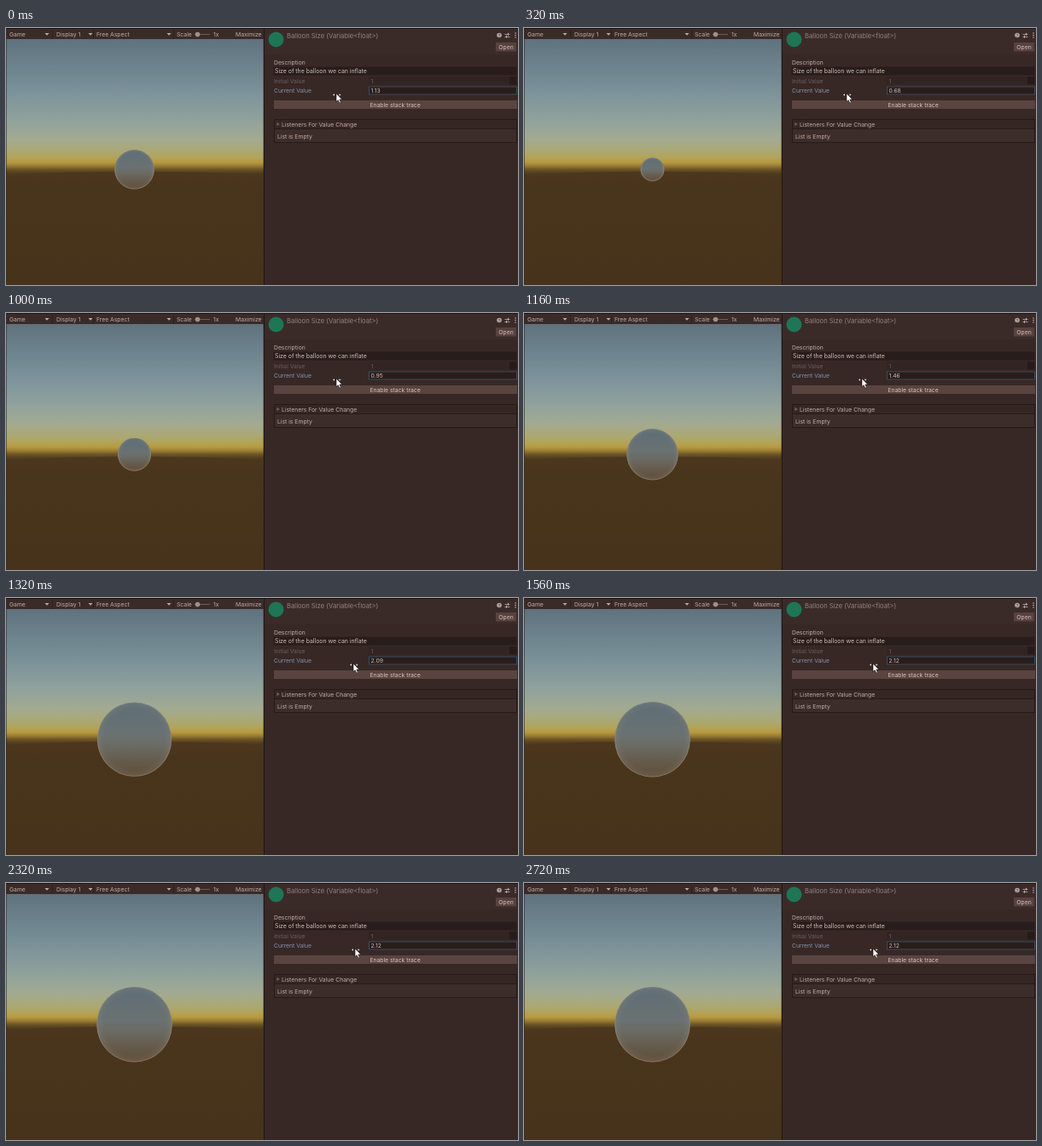
An HTML page with a canvas for the animation above (2.76 s loop, 600 by 302 pixels).

```html
<!DOCTYPE html>
<html lang="en">
<head>
<meta charset="utf-8">
<title>Balloon size</title>
<style>
  html, body { margin: 0; width: 100%; height: 100%; overflow: hidden; background: #372826; }
  canvas { display: block; width: 600px; height: 302px; }
</style>
</head>
<body>
<canvas id="stage" width="600" height="302"></canvas>
<script>
const ctx = document.getElementById('stage').getContext('2d');
const LOOP = 2760, TICK = 40;
const INK = '#c3aca5', BRIGHT = '#d3bdb6', DIM = '#705c57', FIELD = '#291d1b', EDGE = '#261a18';

// [time, value] and [time, pointer x]
const sizeKeys = [[0, 1.13], [320, 0.68], [580, 0.53], [680, 0.53], [1000, 0.95], [1120, 1.31], [1320, 2.09], [1400, 2.12], [2760, 2.12]];
const pointerKeys = [[0, 387], [320, 378], [580, 376], [680, 376], [1000, 387], [1120, 393], [1320, 407], [1400, 409], [2760, 409]];

const slope = (a, b) => (b[1] - a[1]) / (b[0] - a[0]);

function tangent(keys, i) {
  if (i === 0) return slope(keys[0], keys[1]);
  if (i === keys.length - 1) return 0;
  const a = slope(keys[i - 1], keys[i]), b = slope(keys[i], keys[i + 1]);
  return a * b > 0 ? 2 * a * b / (a + b) : 0;
}

// Monotone cubic interpolation
function track(keys, t) {
  let i = 0;
  while (i < keys.length - 2 && t >= keys[i + 1][0]) i++;
  const [t0, v0] = keys[i], [t1, v1] = keys[i + 1];
  const span = t1 - t0, u = (t - t0) / span, w = 1 - u;
  return w * w * (1 + 2 * u) * v0 + u * u * (3 - 2 * u) * v1 +
    span * u * w * (w * tangent(keys, i) - u * tangent(keys, i + 1));
}

function rect(x, y, w, h, fill) {
  ctx.fillStyle = fill;
  ctx.fillRect(x, y, w, h);
}

function frame(x, y, w, h, color) {
  ctx.strokeStyle = color;
  ctx.lineWidth = 1;
  ctx.strokeRect(x + 0.5, y + 0.5, w - 1, h - 1);
}

function shape(points, fill) {
  ctx.beginPath();
  points.forEach(([x, y]) => ctx.lineTo(x, y));
  ctx.closePath();
  ctx.fillStyle = fill;
  ctx.fill();
}

function disc(x, y, r, fill) {
  ctx.beginPath();
  ctx.arc(x, y, r, 0, Math.PI * 2);
  ctx.fillStyle = fill;
  ctx.fill();
}

function label(text, x, midY, color = INK, size = 6.8, align = 'left') {
  ctx.font = `${size}px Inter, sans-serif`;
  ctx.textAlign = align;
  ctx.fillStyle = color;
  ctx.fillText(text, x, midY + 2.5);
}

function ramp(y0, y1, stops) {
  const g = ctx.createLinearGradient(0, y0, 0, y1);
  stops.forEach(([at, color]) => g.addColorStop(at, color));
  return g;
}

function drawScene() {
  const left = 0.5, right = 301.7, middle = (left + right) / 2;
  rect(left, 13, right - left, 289, ramp(13, 174, [
    [0, '#5f727e'], [0.2, '#6d838d'], [0.42, '#7f959b'], [0.6, '#92a39c'],
    [0.73, '#a3aa90'], [0.82, '#aba873'], [0.87, '#b3a355'], [0.9, '#b6993f'],
    [0.925, '#9a7d34'], [0.95, '#6e5626'], [0.975, '#54401f'], [1, '#4a371d']
  ]));
  ctx.beginPath();
  ctx.moveTo(left, 172);
  ctx.quadraticCurveTo(middle, 165, right, 172);
  ctx.lineTo(right, 302);
  ctx.lineTo(left, 302);
  ctx.fillStyle = ramp(168, 302, [[0, '#4c381e'], [0.15, '#49341c'], [1, '#47331b']]);
  ctx.fill();
}

function drawToolbar() {
  rect(0, 1, 302, 12, '#3a2b29');
  [['Game', 4], ['Display 1', 59], ['Free Aspect', 106], ['Scale', 200], ['1x', 243], ['Maximize', 269]]
    .forEach(([text, x]) => label(text, x, 7.2));
  [48, 99, 191].forEach(x => shape([[x - 2.5, 6], [x + 2.5, 6], [x, 8.8]], INK));
  [54, 102, 196].forEach(x => rect(x, 2, 1, 11, '#2d201e'));
  rect(221, 7, 18, 1, '#705c57');
  disc(224.5, 7.5, 2.8, '#a18f89');
}

function drawHeader() {
  rect(303, 1, 297, 30, '#3a2b29');
  disc(316.5, 13.5, 9, '#1e7656');
  label('Balloon Size (Variable<float>)', 329, 9, '#95807a', 7.65);
  disc(578, 8.5, 2.8, '#b5a49d');
  label('?', 578, 8.5, '#3a2b29', 5, 'center');
  rect(584.5, 7, 6, 1, '#a3928c');
  rect(584.5, 10, 6, 1, '#a3928c');
  rect(588, 5.8, 1, 3, INK);
  rect(586, 8.8, 1, 3, INK);
  [6, 8.5, 11].forEach(y => disc(597, y, 0.8, INK));
  rect(574, 17, 24, 10.5, '#57423f');
  label('Open', 586, 22.3, BRIGHT, 6.8, 'center');
}

function drawInspector(value) {
  rect(303, 31, 297, 271, '#372826');
  drawHeader();
  label('Description', 314, 40.5);
  rect(313.5, 45.5, 285, 10, FIELD);
  label('Size of the balloon we can inflate', 315, 50.5, BRIGHT, 6.9);

  label('Initial Value', 314, 62.3, DIM);
  rect(425, 57, 165, 9.5, '#322422');
  label('1', 427.5, 62.3, DIM);
  rect(590, 57, 8.5, 9.5, '#271b19');

  label('Current Value', 314, 73.7, '#8493ad');
  rect(425, 68.5, 174, 10, FIELD);
  frame(425, 68.5, 174, 10, '#3c4c60');
  label(value.toFixed(2), 427.5, 73.7, BRIGHT);

  rect(314, 85, 285, 10, '#594440');
  label('Enable stack trace', 456, 90, '#dac2bb', 6.8, 'center');

  rect(314, 107, 285, 28, '#3c2d2b');
  rect(314, 107, 285, 12, '#352624');
  frame(314, 107, 285, 28, EDGE);
  rect(314, 118, 285, 1, EDGE);
  shape([[317.3, 110.8], [320.8, 113], [317.3, 115.2]], DIM);
  label('Listeners For Value Change', 323, 113.3);
  label('List is Empty', 318, 127.3);
}

function drawBalloon(value) {
  const x = 150.5, y = 166.3;
  const r = 20.35 * value / Math.sqrt(1 - (0.1 * value) ** 2);
  disc(x, y, r, ramp(y - r, y + r, [
    [0, '#5f6e77'], [0.25, '#647074'], [0.45, '#6b7171'], [0.6, '#6a6a62'], [0.8, '#655a4b'], [1, '#5f4e3b']
  ]));
  const rim = ctx.createRadialGradient(x, y, r * 0.82, x, y, r);
  rim.addColorStop(0, 'rgba(165,150,130,0)');
  rim.addColorStop(1, 'rgba(165,150,130,0.16)');
  disc(x, y, r, rim);
  ctx.beginPath();
  ctx.arc(x, y, r - 0.4, 0, Math.PI * 2);
  ctx.strokeStyle = ramp(y - r, y + r, [[0, '#71828a'], [0.5, '#908b78'], [1, '#947863']]);
  ctx.lineWidth = 0.7;
  ctx.stroke();
}

function drawPointer(x) {
  ctx.save();
  ctx.translate(x, 77);
  const arrow = [[0, 0], [0, 9.6], [2.2, 7.7], [3.8, 11.2], [5.4, 10.4], [3.9, 7.1], [6.8, 6.9]];
  shape(arrow, '#fff');
  ctx.strokeStyle = '#150d0c';
  ctx.lineWidth = 0.6;
  ctx.stroke();
  shape([[-4, 1.5], [-2, 0.2], [-2, 2.8]], '#eee');
  shape([[5.5, 1.5], [3.5, 0.2], [3.5, 2.8]], '#eee');
  ctx.restore();
}

function draw(now) {
  const t = Math.floor((now % LOOP) / TICK) * TICK;
  const value = 0.53 + Math.round((track(sizeKeys, t) - 0.53) / 0.03) * 0.03;
  rect(0, 0, 600, 302, '#211614');
  drawScene();
  drawToolbar();
  drawBalloon(value);
  drawInspector(value);
  drawPointer(Math.round(track(pointerKeys, t)));
}

let start;
function tick(now) {
  start ??= now;
  draw(now - start);
  requestAnimationFrame(tick);
}
draw(0);
requestAnimationFrame(tick);
</script>
</body>
</html>
```
